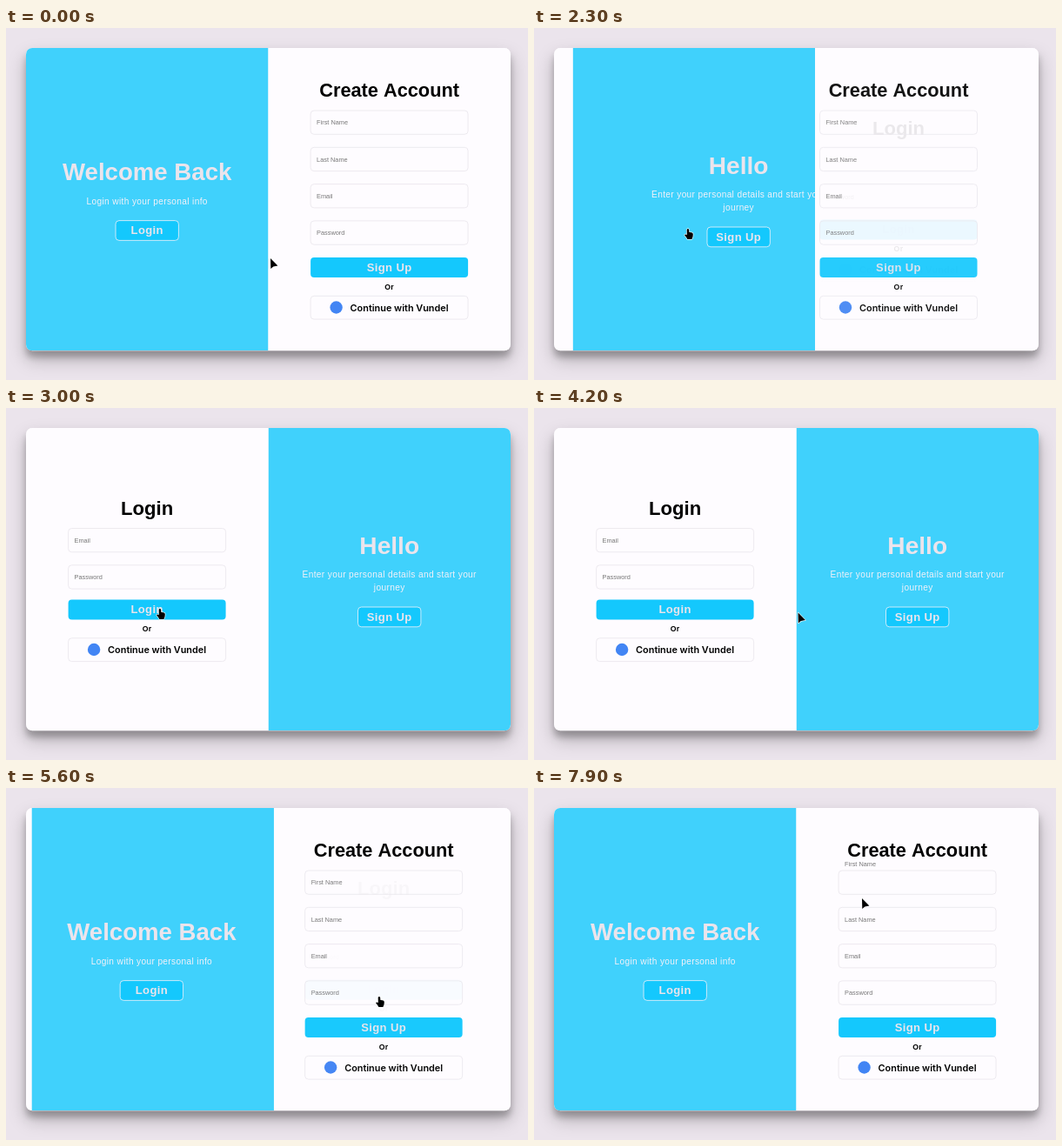
Animation, 600 px wide and 405 px high, one loop 8 s. Source, as an HTML page with a canvas:

```html
<!DOCTYPE html>
<html lang="en">
<head>
<meta charset="utf-8">
<title>Login slider</title>
<style>
html, body { margin: 0; width: 100%; height: 100%; overflow: hidden; background: #ebe4ec; }
canvas { display: block; width: 600px; height: 405px; }
</style>
</head>
<body>
<canvas id="stage"></canvas>
<script>
const LOOP = 8000, W = 600, H = 405;
const CARD = { x: 23, y: 23, w: 557, h: 348.3, r: 7.25 };
const HALF = CARD.w / 2;
const BLUE = '#14c8fd', PALE = '#ebe4ec', SANS = '"Liberation Sans", Arial, sans-serif';
const SLIDE = 600, TO_LOGIN = 2184, TO_SIGNUP = 5066;

const canvas = document.getElementById('stage');
const ratio = window.devicePixelRatio || 1;
canvas.width = W * ratio;
canvas.height = H * ratio;
const ctx = canvas.getContext('2d');

const clamp = v => Math.min(1, Math.max(0, v));
const span = (t, from, to) => clamp((t - from) / (to - from));
const mix = (a, b, k) => a + (b - a) * k;

// cubic-bezier(.42, 0, .58, 1)
function easeInOut(x) {
  if (x <= 0 || x >= 1) return clamp(x);
  let lo = 0, hi = 1;
  for (let i = 0; i < 24; i++) {
    const s = (lo + hi) / 2, u = 1 - s;
    if (1.26 * u * u * s + 1.74 * u * s * s + s * s * s < x) lo = s; else hi = s;
  }
  return lo * lo * (3 - 2 * lo);
}

function text(str, x, y, font, color, align = 'center', spacing = 0) {
  ctx.font = font;
  ctx.fillStyle = color;
  ctx.textAlign = align;
  ctx.letterSpacing = spacing + 'px';
  ctx.fillText(str, x, y);
}

function box(x, y, w, h, r, fill, stroke) {
  ctx.beginPath();
  ctx.roundRect(x, y, w, h, r);
  if (fill) { ctx.fillStyle = fill; ctx.fill(); }
  if (stroke) { ctx.strokeStyle = stroke; ctx.lineWidth = 0.9; ctx.stroke(); }
}

const bold = size => `bold ${size}px ${SANS}`;
const plain = size => `${size}px ${SANS}`;

function shadow(dy, blur, alpha) {
  ctx.save();
  ctx.shadowColor = `rgba(0,0,0,${alpha})`;
  ctx.shadowOffsetY = dy * ratio;
  ctx.shadowBlur = blur * ratio;
  box(CARD.x, CARD.y, CARD.w, CARD.h, CARD.r, '#fefcff');
  ctx.restore();
}

// x is the left edge of the fields
function form(x, alpha, spec, lift = 0) {
  if (alpha <= 0) return;
  const mid = x + 90.5, top = spec.top;
  ctx.save();
  ctx.globalAlpha = alpha;
  text(spec.title, mid, top - 16, bold(spec.size), '#000');
  spec.fields.forEach((name, i) => {
    const y = top + i * 42.3;
    box(x, y, 181, 27.3, 4, null, '#ebe8ee');
    text(name, x + 7, y + 16.4 - (i ? 0 : lift * 21), plain(7.35), '#777', 'left');
  });
  const y = spec.button;
  box(x, y, 181, 22.8, 4, BLUE);
  text(spec.action, mid, y + 15.8, bold(13.06), PALE, 'center', 0.36);
  text('Or', mid, y + 36.5, bold(8.7), '#000', 'center', 0.36);
  box(x, y + 44.2, 181, 26.8, 4, null, '#ebe8ee');
  ctx.beginPath();
  ctx.arc(x + 29.5, y + 57.4, 7.2, 0, Math.PI * 2);
  ctx.fillStyle = '#4285f4';
  ctx.fill();
  text('Continue with Vundel', x + 45.5, y + 61.6, '600 10.88px Inter, sans-serif', '#000', 'left');
  ctx.restore();
}

const SIGNUP = {
  title: 'Create Account', size: 21.76, top: 95, button: 264.1, action: 'Sign Up',
  fields: ['First Name', 'Last Name', 'Email', 'Password']
};
const LOGIN = {
  title: 'Login', size: 22.1, top: 138.5, button: 220.6, action: 'Login',
  fields: ['Email', 'Password']
};

function greeting(x, spec) {
  text(spec.title, x, spec.y, bold(spec.size), PALE);
  spec.lines.forEach((line, i) =>
    text(line, x, spec.y + 27.8 + i * 14.5, plain(10.15), '#f4f1f8', 'center', 0.36));
  box(x - 36.2, spec.button, 72.4, 22.8, 4, BLUE, '#dceefa');
  text(spec.action, x, spec.button + 15.7, bold(13.06), PALE, 'center', 0.36);
}

const WELCOME = {
  title: 'Welcome Back', size: 27.6, y: 174.7, button: 221.6, action: 'Login',
  lines: ['Login with your personal info']
};
const HELLO = {
  title: 'Hello', size: 28.1, y: 167.6, button: 229, action: 'Sign Up',
  lines: ['Enter your personal details and start your', 'journey']
};

function panel(p, loginSide) {
  const x = CARD.x + HALF * p;
  ctx.save();
  ctx.beginPath();
  ctx.rect(x, CARD.y, HALF, CARD.h);
  ctx.clip();
  ctx.fillStyle = 'rgba(20,200,252,.81)';
  ctx.fillRect(x, CARD.y, HALF, CARD.h);
  const drift = HALF * 0.8;
  if (loginSide) greeting(440.7 - drift * (1 - p), HELLO);
  else greeting(162.2 + drift * p, WELCOME);
  ctx.restore();
}

// time, x, y of the pointer tip
const PATH = [
  [0, 304, 265], [700, 304, 265], [1300, 199, 236], [1650, 177, 231],
  [3800, 177, 231], [4600, 429, 240], [6300, 429, 240],
  [7000, 380, 109], [7450, 380, 109], [7800, 377, 127]
];

function pointer(t) {
  let i = 0;
  while (i < PATH.length - 2 && t >= PATH[i + 1][0]) i++;
  const [t0, x0, y0] = PATH[i], [t1, x1, y1] = PATH[i + 1];
  const k = easeInOut(span(t, t0, t1));
  return [mix(x0, x1, k), mix(y0, y1, k)];
}

function arrow() {
  ctx.beginPath();
  ctx.moveTo(0, 0);
  ctx.lineTo(0.3, 12);
  ctx.lineTo(3.3, 9.6);
  ctx.lineTo(8.4, 8.6);
  ctx.closePath();
}

function hand() {
  ctx.beginPath();
  ctx.moveTo(-1.3, 0.8);
  ctx.quadraticCurveTo(0, -1, 1.1, 0.8);
  ctx.lineTo(1.4, 4);
  ctx.quadraticCurveTo(5.6, 3.9, 5.8, 6.2);
  ctx.quadraticCurveTo(6, 9, 4.4, 12);
  ctx.lineTo(-0.6, 12);
  ctx.quadraticCurveTo(-2, 9.4, -3.8, 7.4);
  ctx.quadraticCurveTo(-3.6, 5.6, -1.2, 7);
  ctx.closePath();
}

function cursor(t) {
  const [x, y] = pointer(t);
  const pressing = (t > 1310 && x < 198.5) || (t > 1650 && t < 5000 && (x < 253 || x > 404)) ||
    (t >= 5000 && t <= 6320);
  ctx.save();
  ctx.translate(x, y);
  ctx.lineJoin = 'round';
  ctx.lineWidth = 1.4;
  ctx.strokeStyle = 'rgba(255,255,255,.85)';
  ctx.fillStyle = '#000';
  (pressing ? hand : arrow)();
  ctx.stroke();
  ctx.fill();
  ctx.restore();
}

function draw(t) {
  ctx.setTransform(ratio, 0, 0, ratio, 0, 0);
  ctx.fillStyle = PALE;
  ctx.fillRect(0, 0, W, H);
  shadow(10.15, 20.3, 0.25);
  shadow(7.25, 7.25, 0.22);

  const p = easeInOut(span(t, TO_LOGIN, TO_LOGIN + SLIDE)) -
    easeInOut(span(t, TO_SIGNUP, TO_SIGNUP + SLIDE));
  const loginSide = t >= TO_LOGIN && t < TO_SIGNUP;

  ctx.save();
  ctx.beginPath();
  ctx.roundRect(CARD.x, CARD.y, CARD.w, CARD.h, CARD.r);
  ctx.clip();
  form(71.6 + HALF * (1 - p), p, LOGIN);
  form(350.1 - HALF * p, 1 - p, SIGNUP, easeInOut(span(t, 7100, 7400)));
  panel(p, loginSide);
  ctx.restore();

  cursor(t);
}

const start = performance.now();
function tick() {
  draw((performance.now() - start) % LOOP);
  requestAnimationFrame(tick);
}
tick();
</script>
</body>
</html>
```
